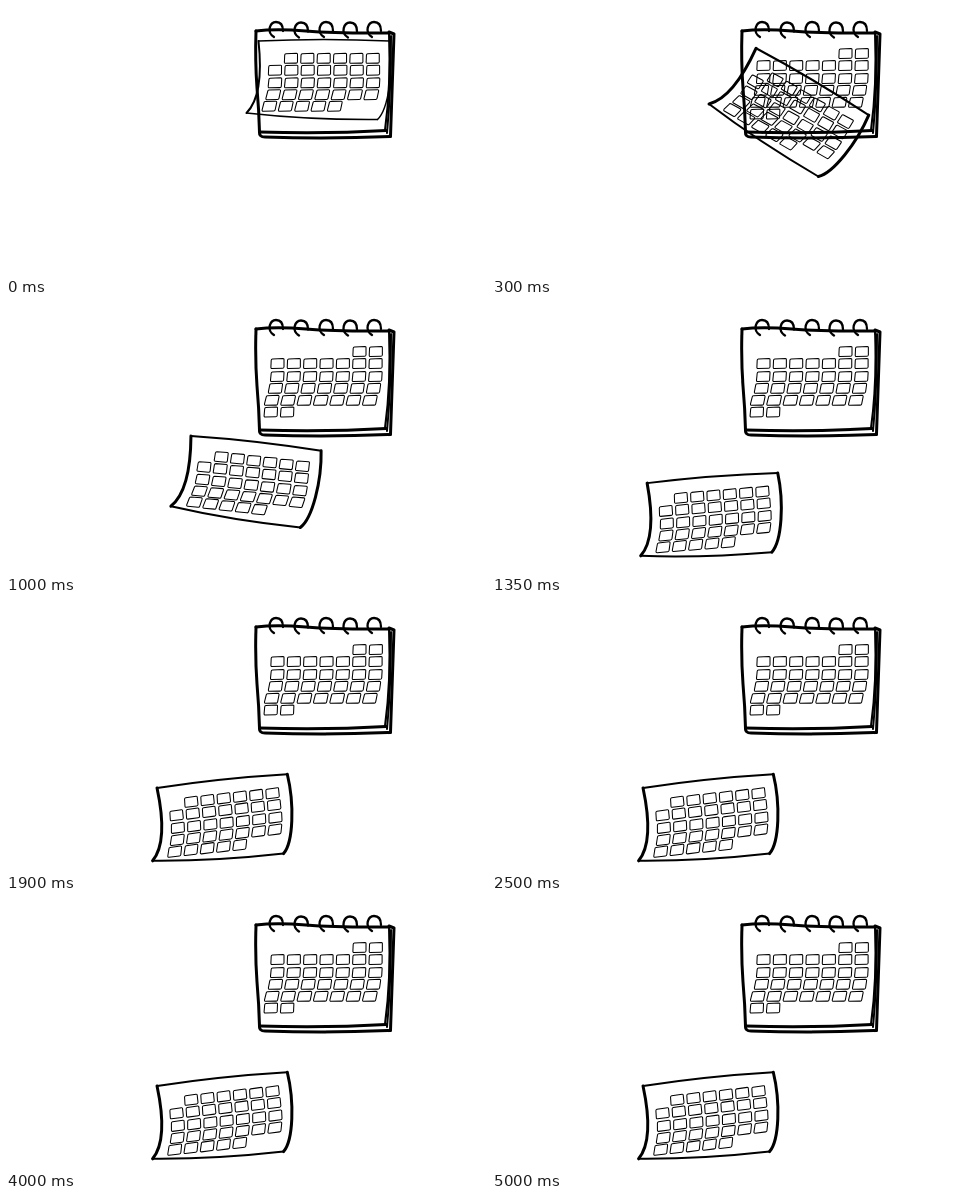
An HTML page that plays this animation: 480 by 270 pixels, repeating every 5.05 s.

```html
<!DOCTYPE html>
<html lang="en">
<head>
<meta charset="utf-8">
<title>Falling calendar page</title>
<style>
  html, body { margin: 0; width: 100%; height: 100%; overflow: hidden; background: #fff; }
  svg { display: block; width: 100vw; height: 100vh; }
  path { fill: none; stroke: #000; stroke-linecap: round; stroke-linejoin: round; }
  .cells { stroke-width: 1.05; }
  .thin { stroke-width: 1.4; }
  .medium { stroke-width: 2; }
  .bold { stroke-width: 3; }
</style>
</head>
<body>
<svg viewBox="0 0 480 270">
  <g>
    <path class="bold" d="M250 25Q249 55 251 82Q253 105 253.5 126"/>
    <path class="bold" d="M250 25Q270 22.5 300 25T384 27"/>
    <path class="medium" d="M383 27Q385 80 379 124"/>
    <path class="bold" d="M383 26L388 28Q386 85 384.5 130"/>
    <path class="bold" d="M253.5 126Q320 128 380 124.5"/>
    <path class="bold" d="M253.5 126Q253 131 259 131Q322 133 384.5 130.5"/>
    <path class="medium" d="M385 30Q385 85 381 127"/>
    <path id="rings" style="stroke-width:2.3"/>
  </g>
  <path id="nextMonth" class="cells"/>
  <g id="page">
    <path id="top" d="M0 0Q65 -3 131 0"/>
    <path id="bottom" d="M-12 72Q50 79 119 78.5"/>
    <path id="left" d="M0 0C3 28 2 58 -12 72"/>
    <path id="right" d="M131 0C135 30 130 68 119 78.5"/>
    <path id="thisMonth" class="cells"/>
  </g>
</svg>
<script>
const $ = id => document.getElementById(id);
const LOOP = 5050, STEP = 50;

// A hand-drawn day box: rounded, leaning left by `lean` at its foot.
function cell(x, y, lean) {
  const w = 13, h = 10;
  return `M${x + 1.5} ${y + .4}L${x + w - 1} ${y}q1.2 0 1 1.5` +
    `L${x + w - lean} ${y + h - 1.5}q-.2 1.3 -1.5 1.3` +
    `L${x + 1 - lean} ${y + h}q-1.3 0 -1.1 -1.4L${x + .2} ${y + 1.8}q.1 -1.2 1.3 -1.4z`;
}

// Each row: first x, y, number of days, lean.
const drawRows = rows => rows.map(([x, y, count, lean]) =>
  Array.from({ length: count }, (_, i) => cell(x + i * 16.35, y, lean)).join('')).join('');

$('thisMonth').setAttribute('d', drawRows([
  [26, 12.3, 6, 0], [10, 24.2, 7, 0], [10.2, 36.8, 7, .4], [9, 48.7, 7, 1.5], [5.2, 60.2, 5, 1.5]
]));
$('nextMonth').setAttribute('d', drawRows([
  [347, 42.5, 2, 0], [265, 54.5, 7, 0], [265, 67.5, 7, .4],
  [263.5, 79.3, 7, 1], [260, 91.3, 7, 1.4], [258.5, 103, 2, .3]
]));
$('rings').setAttribute('d', [270, 295, 320, 344, 368].map((x, i) =>
  `M${x - 2} ${31 + i % 2 * .5}c-8 -5 -4 -15 2 -15c5 0 7 4 7 9`).join(''));

// Time, page centre x and y, angle.
const keys = [
  [0, 306, 73, 0], [300, 292, 103, 30.7], [550, 279, 129, 22.1],
  [1000, 235.3, 176, 6.5], [1400, 209.7, 218, -6]
];

function poseAt(t) {
  const next = keys.findIndex(key => key[0] > t);
  if (next < 0) return keys[keys.length - 1];
  const a = keys[next - 1], b = keys[next], u = (t - a[0]) / (b[0] - a[0]);
  return a.map((v, i) => v + (b[i] - v) * u);
}

function draw(now) {
  const t = Math.floor(now % LOOP / STEP) * STEP;
  const attached = t === 0;
  const [, x, y, angle] = poseAt(t);
  $('page').setAttribute('transform', attached ? 'translate(252.5 35)'
    : `translate(${x} ${y}) rotate(${angle}) translate(-55 -38)`);
  $('nextMonth').style.display = attached ? 'none' : '';
  $('top').setAttribute('class', attached ? 'thin' : 'medium');
  $('bottom').setAttribute('class', attached ? 'thin' : 'medium');
  $('left').setAttribute('class', attached ? 'medium' : 'bold');
  $('right').setAttribute('class', attached ? 'thin' : 'bold');
}

const start = performance.now();
function tick() {
  draw(performance.now() - start);
  requestAnimationFrame(tick);
}
tick();
</script>
</body>
</html>
```
